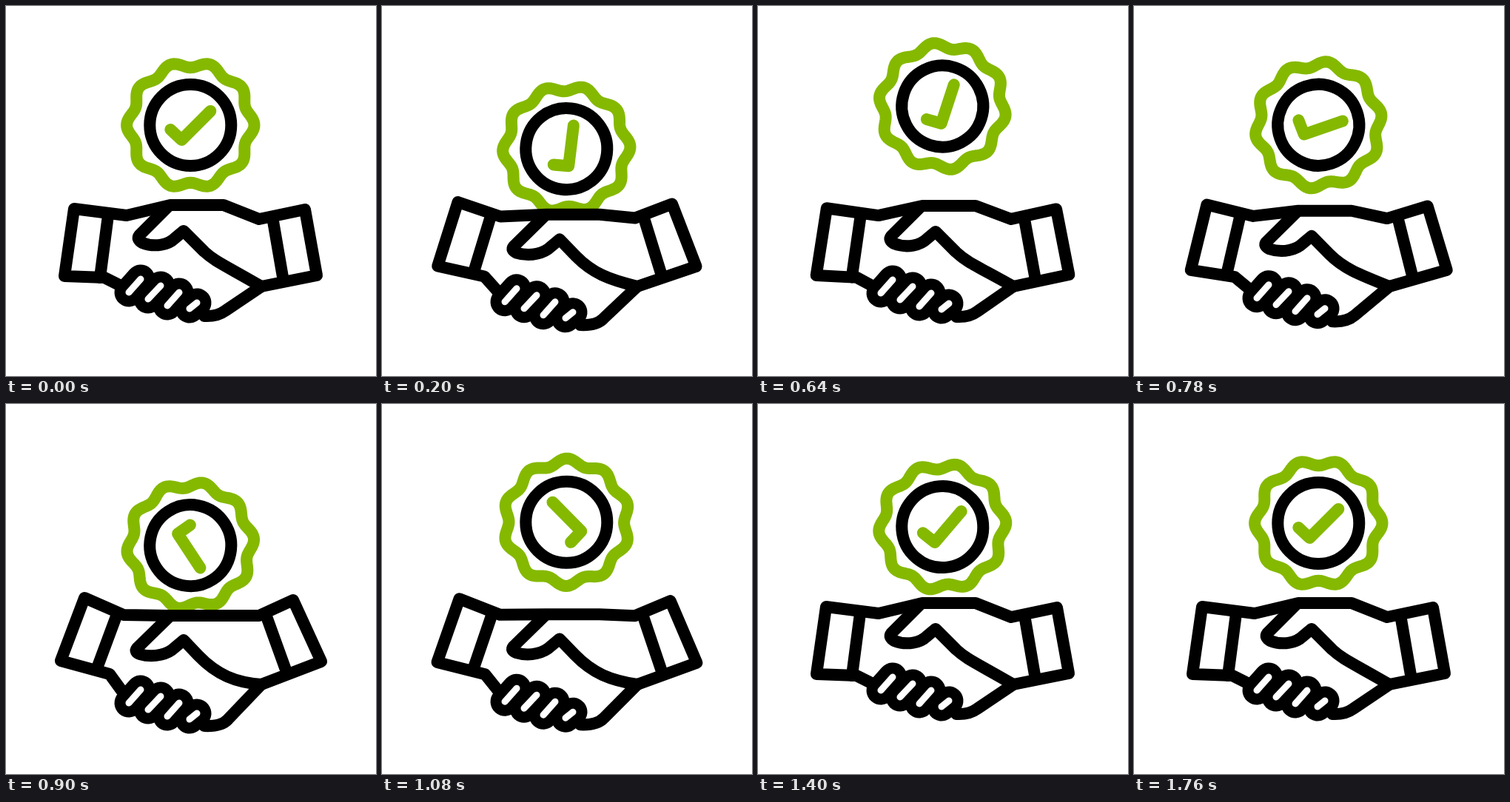
Recreate the animation shown at these times as an HTML page. Size 500 px wide and 500 px high, loop 2 s.

```html
<!DOCTYPE html>
<html lang="en">
<head>
<meta charset="utf-8">
<title>Handshake badge</title>
<style>
html, body { margin: 0; width: 100%; height: 100%; overflow: hidden; background: #fff; }
svg { display: block; width: 100vw; height: 100vh; }
path, circle { fill: none; stroke: #000; stroke-width: 16; stroke-linecap: round; stroke-linejoin: round; }
#badge .green { stroke: #85b900; stroke-width: 16; }
#fingers path { stroke-width: 39; }
#fingers path.gap { stroke: #fff; stroke-width: 9; }
</style>
</head>
<body>
<svg viewBox="0 0 500 500">
  <g id="badge">
    <path id="rosette" class="green"/>
    <circle r="55"/>
    <path class="green" d="M-27 6L-12 20L27 -19"/>
  </g>
  <g id="arms"></g>
  <g id="fingers"></g>
</svg>
<script>
const LOOP = 2000;
const $ = id => document.getElementById(id);

function addPath(parent, d = '', cls = '') {
  const p = document.createElementNS('http://www.w3.org/2000/svg', 'path');
  p.setAttribute('d', d);
  p.setAttribute('class', cls);
  return parent.appendChild(p);
}

// Ten-lobed rosette
let ring = '';
for (let i = 0; i < 240; i++) {
  const a = i * Math.PI / 120, r = 82 + 4.2 * Math.cos(10 * a);
  ring += (i ? 'L' : 'M') + (r * Math.cos(a)).toFixed(2) + ' ' + (r * Math.sin(a)).toFixed(2);
}
$('rosette').setAttribute('d', ring + 'Z');

// Each line as [relaxed, pressed down]
const arms = [
  ['M155 378L133 367L79 365L92 274L163 283L222 269L294 269L342 288L404 275L420 364L345 379',
   'M156 387L140 365L74 347L106 262L159 285L222 286L294 286L342 286L388 265L426 348L345 379'],
  ['M138 283L127 367', 'M150 284L123 357'],
  ['M360 285L375 372', 'M352 287L379 362'],
  ['M220 270L180 310Q176 315 184 320C202 327 220 322 228 314L240 304L268 332C282 345 295 350 345 379',
   'M220 288L177 330Q173 335 181 338C201 344 220 337 228 329L240 319L260 340C285 366 310 376 345 379'],
  ['M345 379L296 412Q285 420 268 419', 'M345 379L300 426Q291 436 268 435']
].map(([rest, bent]) => ({ rest, to: bent.match(/\d+/g), el: addPath($('arms')) }));

const fingers = ['M166 387L182 369', 'M192 396L209 378', 'M218 405L234 387', 'M248 409L258 401'];
for (const cls of ['', 'gap']) fingers.forEach(d => addPath($('fingers'), d, cls));

// Smooth curve through [time, value] points, flat at every turning point
function curve(pts) {
  const n = pts.length - 1;
  const slope = i => (pts[i + 1][1] - pts[i][1]) / (pts[i + 1][0] - pts[i][0]);
  const tangent = pts.map((_, i) => {
    if (i === 0 || i === n) return 0;
    const a = slope(i - 1), b = slope(i);
    return a * b > 0 ? 2 * a * b / (a + b) : 0;
  });
  return t => {
    let i = 0;
    while (i < n - 1 && t >= pts[i + 1][0]) i++;
    const [t0, v0] = pts[i], [t1, v1] = pts[i + 1];
    const h = t1 - t0, u = (t - t0) / h, w = 1 - u;
    return w * w * ((1 + 2 * u) * v0 + u * h * tangent[i])
         + u * u * ((1 + 2 * w) * v1 - w * h * tangent[i + 1]);
  };
}

const height = curve([[0, 161], [200, 193], [300, 200], [540, 143], [640, 135.5], [900, 191],
  [970, 201], [1080, 160], [1200, 147], [1400, 166], [1510, 171], [1620, 168], [1760, 161], [LOOP, 161]]);
const spin = curve([[0, 0], [200, -38], [370, -45], [640, -27], [900, 101],
  [1080, 270], [1400, 355.5], [1760, 360], [LOOP, 360]]);
const press = curve([[0, 0], [200, 0.75], [310, 1.12], [640, 0.06], [900, 1],
  [985, 1.35], [1080, 0.9], [1240, 0], [LOOP, 0]]);

function draw(t) {
  $('badge').setAttribute('transform', `translate(249.3 ${height(t)}) rotate(${spin(t)})`);
  const p = press(t), bend = Math.min(p, 1.08);
  for (const { rest, to, el } of arms) {
    let i = 0;
    el.setAttribute('d', rest.replace(/\d+/g, v => (+v + (to[i++] - v) * bend).toFixed(2)));
  }
  $('fingers').setAttribute('transform', `translate(0 ${17 * p})`);
}

const start = performance.now();
function tick() {
  draw((performance.now() - start) % LOOP);
  requestAnimationFrame(tick);
}
tick();
</script>
</body>
</html>
```
